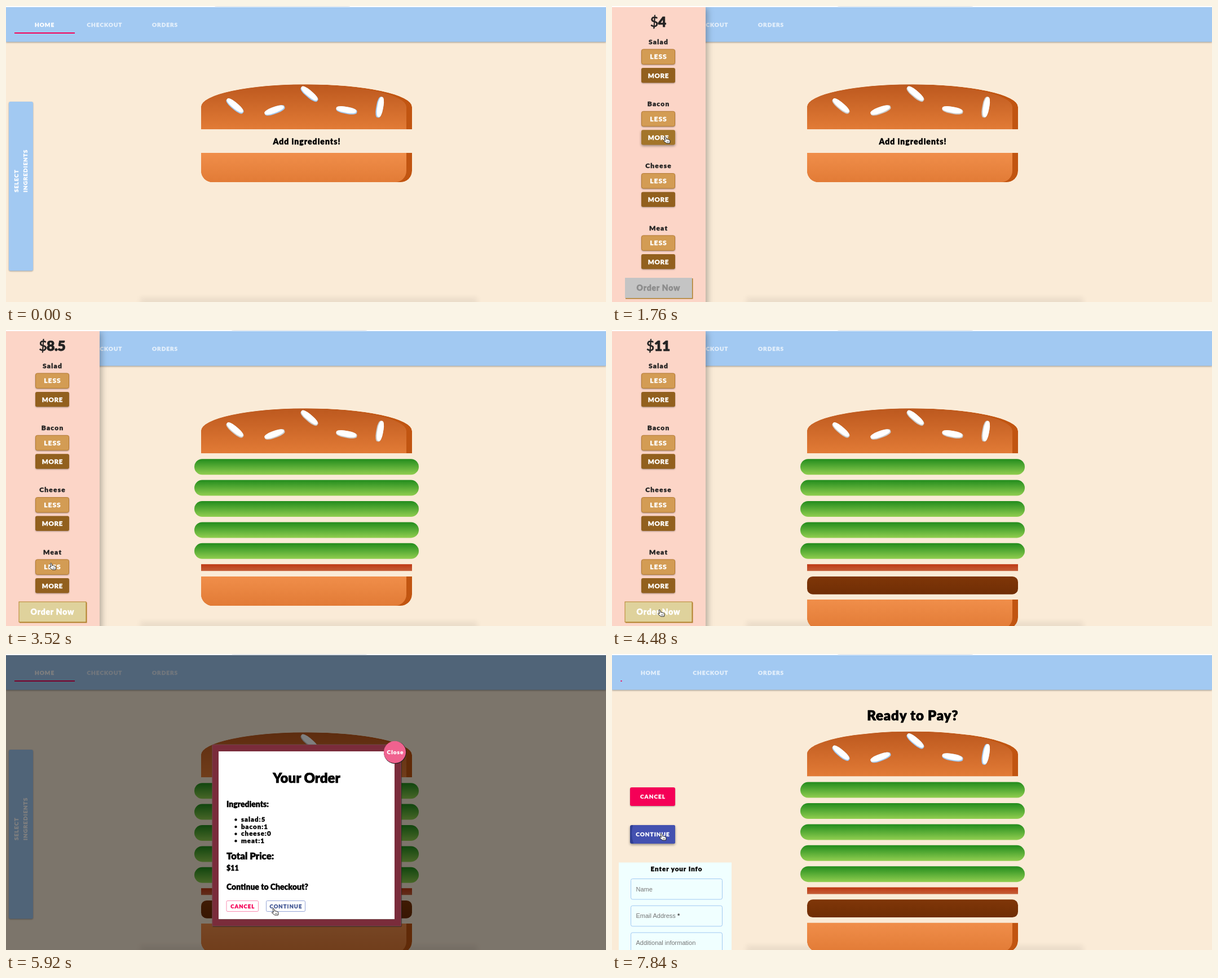
An HTML page for the animation above (8000 ms loop, 1064 by 526 pixels).

```html
<!DOCTYPE html>
<html lang="en">
<head>
<meta charset="utf-8">
<title>Burger builder</title>
<style>
html, body { margin: 0; width: 100%; height: 100%; overflow: hidden; background: #faebd7; }
svg { display: block; width: 1064px; height: 526px; font-family: Lato, sans-serif; font-weight: 900; }
text { stroke-linejoin: round; }
.lift { filter: drop-shadow(0 1px .8px rgba(0,0,0,.32)); }
.high { filter: drop-shadow(0 2px 2px rgba(0,0,0,.4)); }
.bar { filter: drop-shadow(0 1px 1.5px rgba(0,0,0,.38)); }
.side { filter: drop-shadow(3px 2px 6px rgba(0,0,0,.3)); }
.blur { filter: blur(5px); }
.haze { filter: blur(2px); }
</style>
</head>
<body>
<svg viewBox="0 0 1064 526">
  <defs id="defs"></defs>
  <g id="stage"></g>
</svg>
<script>
const BLUE = '#a2c9f2', PINK = '#f50057', LOOP = 8000, STEP = 160;
const TOP_BUN = 'M346 80V40A187 40 0 0 1 720 40V80Z';
const LOW_BUN = 'M346 0H720V32A20 20 0 0 1 700 52H366A20 20 0 0 1 346 32Z';
const LAYERS = {
  salad: { x: 334, w: 398, h: 28, r: 14, gap: 37.4, price: .5 },
  bacon: { x: 346, w: 374, h: 12, r: 0, gap: 21.7, price: 2 },
  meat: { x: 346, w: 374, h: 31.8, r: 10, gap: 41.2, price: 2.5 }
};
// centre x, centre y, angle
const SEEDS = [[406, 38.7, 40], [476.5, 46.2, -20], [538, 17.3, 40], [604, 46.2, 10], [662.7, 40.7, 100]];
// times at which each ingredient is added
const ADDED = { salad: [2400, 2560, 2720, 2880, 3040], bacon: [3200], meat: [3840] };
// pointer path: time, x, y
const PATH = [
  [160, 150, 300], [480, 30, 300], [800, 30, 300], [1760, 94, 232], [2080, 88, 122],
  [3040, 88, 122], [3200, 86, 233], [3520, 79.5, 414], [3680, 82, 450], [4000, 82, 450],
  [4320, 84, 497], [4480, 84, 497], [4800, 98, 259], [5120, 98, 259], [5760, 474, 452],
  [6080, 474, 452], [6720, 115, 303], [7040, 87, 319], [LOOP, 87, 319]
];

const gradient = (id, a, b) => `<linearGradient id="${id}" x2="0" y2="1">
  <stop stop-color="${a}"/><stop offset="1" stop-color="${b}"/></linearGradient>`;
const clip = (id, shape) => `<clipPath id="${id}">${shape}</clipPath>`;
const group = (body, attrs) => `<g ${attrs}>${body}</g>`;
const rect = (x, y, w, h, fill, r = 0, attrs = '') =>
  `<rect x="${x}" y="${y}" width="${w}" height="${h}" rx="${r}" fill="${fill}" ${attrs}/>`;
const plain = (x, y, s, size, fill, attrs = '') =>
  `<text x="${x}" y="${y}" font-size="${size}" fill="${fill}" ${attrs}>${s}</text>`;
// a thin round stroke gives the letters their soft, heavy look
const text = (x, y, s, size, fill = '#fff', gap = 1, attrs = '') => plain(x, y, s, size, fill,
  `letter-spacing="${gap}" stroke="${fill}" stroke-width="${size * .03}" ${attrs}`);
const label = (x, y, s, size, fill, gap = 1, attrs = '') =>
  text(x + gap / 2, y, s, size, fill, gap, `text-anchor="middle" ${attrs}`);

const ease = p => p * p * (3 - 2 * p);
const ramp = (t, a, b) => ease(Math.min(1, Math.max(0, (t - a) / (b - a))));
const mix = (a, b, p) => a + (b - a) * p;

document.getElementById('defs').innerHTML =
  gradient('top', '#bc581e', '#e27b36') + gradient('low', '#f08e4a', '#e27b36') +
  gradient('salad', '#228c1d', '#91ce50') + gradient('bacon', '#bf3813', '#c45e38') +
  gradient('meat', '#7f3608', '#702e05') +
  clip('topClip', `<path d="${TOP_BUN}"/>`) + clip('lowClip', `<path d="${LOW_BUN}"/>`) +
  clip('nextClip', rect(32, 304, 80, 33, '#000', 3));

function pointer(t) {
  const i = PATH.findIndex(k => k[0] > t);
  if (i < 1) return null;
  const [a, b] = [PATH[i - 1], PATH[i]], p = ramp(t, a[0], b[0]);
  return { x: mix(a[1], b[1], p), y: mix(a[2], b[2], p) };
}

function bun(id, path, y, extra = '') {
  return group(`<path d="${path}" fill="#c15511"/>
    <path d="${path}" fill="url(#${id})" transform="translate(-10)"/>${extra}`,
    `transform="translate(0 ${y})" clip-path="url(#${id}Clip)"`);
}

function burger(y, counts, shade) {
  const seeds = SEEDS.map(([x, cy, a]) => group(
    rect(-18.7, -6.2, 37.4, 12.4, shade, 15, 'ry="5"') + rect(-18.7, -6.2, 36, 10.6, '#fff', 15, 'ry="4.6"'),
    `transform="translate(${x} ${cy}) rotate(${a})"`)).join('');
  let out = bun('top', TOP_BUN, y, seeds), at = y + 90;
  for (const name in LAYERS) {
    const { x, w, h, r, gap } = LAYERS[name];
    for (let i = 0; i < counts[name]; i++, at += gap) out += rect(x, at, w, h, `url(#${name})`, r);
  }
  if (at === y + 90) {
    out += label(533, 245.5, 'Add ingredients!', 14, '#000');
    at = 261;
  }
  return out + bun('low', LOW_BUN, at);
}

function header(t) {
  const active = t < 6240 ? 0 : t < 7600 ? 1 : -1;
  const back = ramp(t, 7540, 7840);
  const left = mix(mix(15, 122, ramp(t, 6160, 6460)), 15.5, back);
  const tabs = ['HOME', 'CHECKOUT', 'ORDERS'].map((s, i) =>
    label([68, 174.5, 281.5][i], 36.5, s, 10, '#fff', 1, i === active ? '' : 'opacity=".72"')).join('');
  return rect(0, 2, 1064, 61.7, BLUE, 0, 'class="bar"') + tabs + rect(left, 47, mix(107, 2, back), 2, PINK);
}

function sideTab() {
  return rect(5, 170, 43, 300.5, BLUE, 3, 'class="lift"') +
    text(21.5, 331, 'SELECT', 10, '#fff', 1, 'transform="rotate(-90 21.5 331)"') +
    text(38, 331, 'INGREDIENTS', 10, '#fff', .9, 'transform="rotate(-90 38 331)"');
}

function drawer(x, total, ready, over) {
  let out = rect(-20, 2, 186, 540, '#fcd5c7', 0, 'class="side"') +
    label(82, 37, `<tspan font-weight="400">$</tspan>${total}`, 25, '#222', -.6);
  ['Salad', 'Bacon', 'Cheese', 'Meat'].forEach((name, i) => {
    const y = i * 110.3;
    const more = over(52, y + 110, 60, 27);
    over(52, y + 76.5, 60, 27);
    out += label(82, y + 67.8, name, 12, '#222', 1.2) +
      rect(52.5, y + 77, 59, 26.5, '#d39c54', 3, 'stroke="#b57a2f" class="lift"') +
      label(82, y + 94.3, 'LESS', 12) +
      rect(52, y + 110, 60, 26.5, more ? '#a3752a' : '#92601e', 3, `class="${more ? 'high' : 'lift'}"`) +
      label(82, y + 127.8, 'MORE', 11.5, '#fff', .7);
  });
  over(23, 483, 119, 36);
  out += rect(24, 484, 119.5, 36.5, '#ad7f2b') +
    rect(23, 483, 119, 36, ready ? '#dfd29c' : '#c4c4c4', 0, ready ? 'stroke="#b5832b"' : '') +
    label(82, 506, 'Order Now', 14, ready ? '#fff' : '#8c8c8c', .8);
  return group(out, `transform="translate(${x})"`);
}

function modal(show, counts, total, over) {
  over(391, 438, 57, 20);
  over(461, 438, 70, 20);
  const line = (y, s, size) => text(391, y, s, size, '#000', 0);
  const outline = (x, w, s, stroke, fill) => rect(x + .5, 438.5, w, 19, '#fff', 2, `stroke="${stroke}"`) +
    label(x + w / 2 + .5, 451.5, s, 9.5, fill);
  const list = ['salad', 'bacon', 'cheese', 'meat'].map((name, i) => {
    const y = 298 + i * 12.6;
    return `<circle cx="407.5" cy="${y - 3.5}" r="2.2"/>` +
      text(417, y, `${name}:${counts[name] || 0}`, 11.5, '#000');
  }).join('');
  const frame = '<path d="M366.5 484H701V162" fill="none" stroke="#111"/>' +
    rect(371.5, 167, 323.5, 310.5, 'none', 0, 'stroke="#7a2c3b" stroke-width="12"') +
    rect(366, 161, 334.5, 322.5, 'none', 0, 'stroke="#6b5a5a" stroke-width=".6"');
  const box = group(frame, `opacity="${show}"`) + rect(377, 173, 312, 298, '#fff') +
    label(533, 229, 'Your Order', 24, '#000', 0) + line(271.5, 'Ingredients:', 14) + list +
    line(365, 'Total Price:', 16.8) + line(385, '$' + total, 12.5) +
    line(419, 'Continue to Checkout?', 14) +
    outline(390.5, 56.5, 'CANCEL', '#f98cb0', PINK) + outline(461, 69, 'CONTINUE', '#95a5d6', '#465a96') +
    '<circle cx="690" cy="175" r="20" fill="#222"/><circle cx="689.5" cy="174.3" r="19.6" fill="#f0628f"/>' +
    label(690, 177.5, 'Close', 10);
  return rect(0, 2, 1064, 524, '#000', 0, `opacity="${.5 * show ** 2.4}"`) + group(box, `opacity="${show}"`);
}

function checkout(t, spot, over) {
  over(32, 237, 80, 33);
  const hot = over(32, 304, 80, 33);
  let out = label(533, 118, 'Ready to Pay?', 24, '#000', .8) +
    rect(32, 237, 80, 33, PINK, 3, 'class="lift"') + label(72, 257, 'CANCEL', 10) +
    rect(32, 304, 80, 33, hot ? '#303f94' : BLUE, 3, `class="${hot ? 'high' : 'lift'}"`);
  if (t >= 7520) {
    const r = mix(5, 52, ramp(t, 7480, 7840));
    out += `<circle cx="${spot.x}" cy="${spot.y}" r="${r}" fill="#4351b0" clip-path="url(#nextClip)"/>`;
  }
  out += label(72, 324, 'CONTINUE', 10);
  if (t >= 7680) {
    out += rect(12, 370.5, 200, 170, '#f0ffff') + label(114, 386, 'Enter your Info', 11.5, '#000');
    ['Name', 'Email Address <tspan font-weight="700" fill="#444">*</tspan>', 'Additional information'].forEach((s, i) => {
      const y = 399.5 + i * 47.8;
      out += rect(33.5, y, 162, 36.5, 'none', 3, `stroke="${BLUE}"`) +
        plain(42.5, y + 22, s, 11, '#757575', 'font-family="Liberation Sans, sans-serif" font-weight="400"');
    });
  }
  return out;
}

function cursor({ x, y }, hand) {
  const shape = hand
    ? '<path d="M-1 1Q0-1 1.4 1L2.6 5Q4 4 5 5.3Q6.4 4.6 7.2 6Q8.8 5.8 9 7.6L8.6 12H2.8L-2.4 8Q-2.8 6.4-.8 6.6L.5 7Z" fill="#fff" stroke="#222"/><path d="M4 8V10.5M6 8V10.5" stroke="#222" stroke-width=".7"/>'
    : '<path d="M0 0V10L2.3 8L4 11.8L5.8 11L4.2 7.3H7.3Z" fill="#000" stroke="#fff" stroke-width=".7"/>';
  return group(shape, `transform="translate(${x} ${y})"`);
}

function scene(t) {
  const spot = pointer(t), paying = t >= 6240;
  let hand = false;
  const over = (x, y, w, h) => {
    const hit = !!spot && spot.x >= x && spot.x <= x + w && spot.y >= y && spot.y <= y + h;
    hand = hand || hit;
    return hit;
  };
  const counts = {};
  let total = 4;
  for (const name in ADDED) {
    counts[name] = ADDED[name].filter(at => at <= t).length;
    total += counts[name] * LAYERS[name].price;
  }
  const open = ramp(t, 640, 900) - ramp(t, 4480, 4720);
  const show = paying ? 0 : ramp(t, 4640, 4940);
  const shade = t > 800 && !paying ? '#c9c9c9' : BLUE;

  let out = rect(0, 0, 1064, 526, '#faebd7') + rect(238, 518, 598, 20, '#000', 0, 'class="blur" opacity=".06"') +
    burger(paying ? 137.6 : 139.2, counts, shade) + header(t);
  if (paying) out += checkout(t, spot, over);
  else {
    out += sideTab();
    if (open > 0) out += drawer(-190 * (1 - open), total, total > 4, over);
    else if (show > 0) out += modal(show, counts, total, over);
    else over(5, 170, 43, 300);
  }
  out += rect(0, 0, 1064, 2, '#fff') + group(
    rect(t < 160 ? 370 : 400, -4, 240, 5, '#8a94a4', 0, 'class="haze" opacity=".6"'), 'clip-path="inset(0)"');
  return out + (spot ? cursor(spot, hand) : '');
}

const stage = document.getElementById('stage');
let last = -1;
function tick(now) {
  const t = Math.floor(now % LOOP / STEP) * STEP;
  if (t !== last) stage.innerHTML = scene(last = t);
  requestAnimationFrame(tick);
}
requestAnimationFrame(tick);
</script>
</body>
</html>
```
